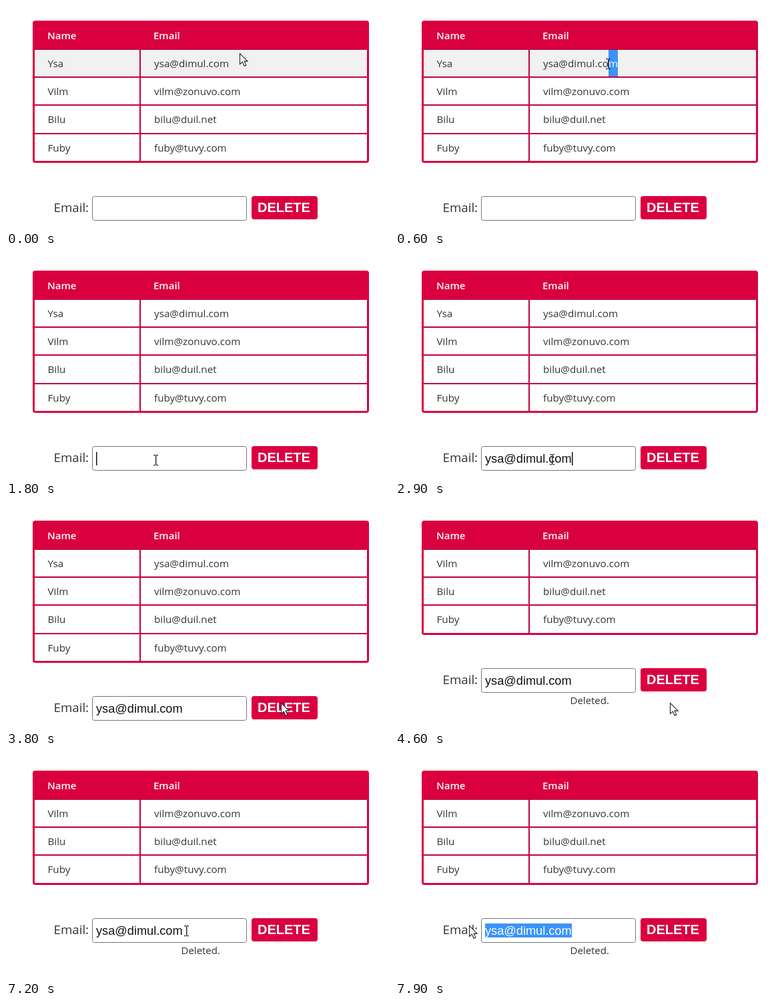
An HTML page with a canvas for the animation above (8000 ms loop, 574x334 px).

```html
<!DOCTYPE html>
<html lang="en">
<head>
<meta charset="utf-8">
<title>Delete by email</title>
<style>
  html, body { margin: 0; width: 100%; height: 100%; overflow: hidden; background: #fff; }
  canvas { display: block; }
</style>
</head>
<body>
<canvas id="stage" width="574" height="334"></canvas>
<script>
const ctx = document.getElementById('stage').getContext('2d');
const LOOP = 8000;
const RED = '#da0040', LINE = '#c3003d', BLUE = '#3b93fa', INK = '#333';
const SANS = '"Open Sans", "Noto Sans", sans-serif';
const ARIAL = '"Liberation Sans", Arial, sans-serif';
const CELL = `15.2px ${SANS}`;
const ROW = 42.2, TOP = 65;

const people = [
  ['Ysa', 'ysa@dimul.com'],
  ['Vilm', 'vilm@zonuvo.com'],
  ['Bilu', 'bilu@duil.net'],
  ['Fuby', 'fuby@tuvy.com']
];

const PASTE = 2600, DELETE = 4100;

// Pointer stops: time, x, y
const path = [
  [0, 350, 71], [100, 350, 71], [400, 337, 87], [500, 337, 87], [900, 222, 89],
  [1000, 222, 89], [1200, 231, 127], [1300, 231, 127], [1650, 224, 307],
  [2800, 224, 307], [3500, 412, 296], [4800, 412, 296], [5350, 323, 294],
  [5500, 323, 294], [6000, 297, 306], [6500, 297, 306], [7000, 270, 263],
  [7200, 270, 263], [7700, 111, 255], [8000, 111, 255]
];

const within = (t, a, b) => t >= a && t < b;

function pointerAt(t) {
  const i = Math.max(1, path.findIndex(p => p[0] > t));
  const [t0, x0, y0] = path[i - 1], [t1, x1, y1] = path[i];
  const u = (t - t0) / (t1 - t0), k = u * u * (3 - 2 * u);
  return { x: x0 + (x1 - x0) * k, y: y0 + (y1 - y0) * k };
}

function rect(x, y, w, h, color) {
  ctx.fillStyle = color;
  ctx.fillRect(x, y, w, h);
}

function rounded(x, y, w, h, r) {
  ctx.beginPath();
  ctx.roundRect(x, y, w, h, r);
}

function text(str, x, y, font, color) {
  ctx.font = font;
  ctx.fillStyle = color;
  ctx.fillText(str, x, y);
}

// Highlights the letters from the pointer to the end of the text
function highlight(str, x, y, font, pointerX, top, height) {
  ctx.font = font;
  const width = n => ctx.measureText(str.slice(0, n)).width;
  let n = 0;
  while (n < str.length && x + (width(n) + width(n + 1)) / 2 < pointerX - 2) n++;
  if (n === str.length) return;
  const left = Math.round(x + width(n)), right = Math.round(x + width(str.length));
  ctx.save();
  ctx.beginPath();
  ctx.rect(left, top, right - left, height);
  ctx.clip();
  rect(left, top, right - left, height, BLUE);
  text(str, x, y, font, '#fff');
  ctx.restore();
}

function drawTable(t, rows, pointer) {
  const bottom = Math.round(TOP + rows.length * ROW + 2);
  rounded(40, 22, 504, bottom - 22, 4);
  ctx.fillStyle = RED;
  ctx.fill();
  text('Name', 62, 50, `600 15px ${SANS}`, '#fff');
  text('Email', 221, 50, `600 15px ${SANS}`, '#fff');
  rect(43, TOP - 1, 498, 2, LINE);

  rows.forEach(([name, email], i) => {
    const y = Math.round(TOP + i * ROW) + 1, next = Math.round(TOP + (i + 1) * ROW);
    const base = Math.round(92 + i * ROW);
    const hover = pointer.y >= y - 1 && pointer.y < next;
    rect(43, y, 498, next - y - 1, hover ? '#f1f1f1' : '#fff');
    if (i < rows.length - 1) rect(43, next - 1, 498, 2, LINE);
    text(name, 62.5, base, CELL, INK);
    text(email, 222, base, CELL, INK);
    if (i === 0 && within(t, 500, 1650)) {
      highlight(email, 222, base, CELL, t < 950 ? pointer.x : 222, y, next - y - 1);
    }
  });
  rect(200, TOP, 2, bottom - TOP - 2, LINE);
}

function drawForm(t, shift, pointer) {
  const font = `18.2px ${ARIAL}`, email = people[0][1];
  ctx.save();
  ctx.translate(0, shift);
  text('Email:', 71.5, 310, `18.7px ${SANS}`, INK);
  rounded(129.5, 286.5, 231, 36, 3);
  ctx.strokeStyle = '#767676';
  ctx.lineWidth = 1;
  ctx.stroke();
  rounded(368, 286, 99, 35, 4);
  ctx.fillStyle = RED;
  ctx.fill();
  text('DELETE', 377, 310, `bold 20px ${ARIAL}`, '#fff');

  const pasted = t >= PASTE;
  if (pasted) text(email, 135, 311, font, '#111');
  if (t >= 7200) highlight(email, 135, 311, font, pointer.x, 294, 21);

  const focusAt = pasted ? PASTE : 1700;
  if (within(t, 1700, 3700) && (t - focusAt) % 1000 < 500) {
    ctx.font = font;
    const x = pasted ? 135 + Math.round(ctx.measureText(email).width) : 135;
    rect(x, 295, 1.5, 20, '#111');
  }
  ctx.restore();
}

function drawMessage(t, pointer) {
  const font = `15px ${SANS}`;
  text('Deleted.', 262.5, 298, font, INK);
  if (within(t, 5500, 7050)) {
    highlight('Deleted.', 262.5, 298, font, t < 6100 ? pointer.x : 297, 282, 21);
  }
}

function drawArrow(x, y) {
  const tip = new Path2D('M0 0V16L3.8 12.6L6.5 18.8L9.3 17.6L6.6 11.6H11.6Z');
  ctx.save();
  ctx.translate(x + .5, y + .5);
  ctx.fillStyle = '#fff';
  ctx.fill(tip);
  ctx.strokeStyle = '#222';
  ctx.lineWidth = 1.1;
  ctx.stroke(tip);
  ctx.restore();
}

function drawBeam(x, y) {
  const color = '#222';
  rect(x, y - 7, 1.4, 14, color);
  for (const end of [y - 8, y + 7]) {
    rect(x - 3, end, 3, 1.2, color);
    rect(x + 1, end, 3, 1.2, color);
  }
}

function draw(t) {
  const pointer = pointerAt(t), deleted = t >= DELETE;
  rect(0, 0, 574, 334, '#fff');
  drawTable(t, deleted ? people.slice(1) : people, pointer);
  drawForm(t, deleted ? -42 : 0, pointer);
  if (deleted) drawMessage(t, pointer);

  const overField = t > 1500 && pointer.x > 129 && pointer.x < 361;
  const beam = within(t, 380, 1050) || overField && (pointer.y > 286 || t > 6500);
  (beam ? drawBeam : drawArrow)(Math.round(pointer.x), Math.round(pointer.y));
}

const start = performance.now();
function tick() {
  draw((performance.now() - start) % LOOP);
  requestAnimationFrame(tick);
}
tick();
</script>
</body>
</html>
```
